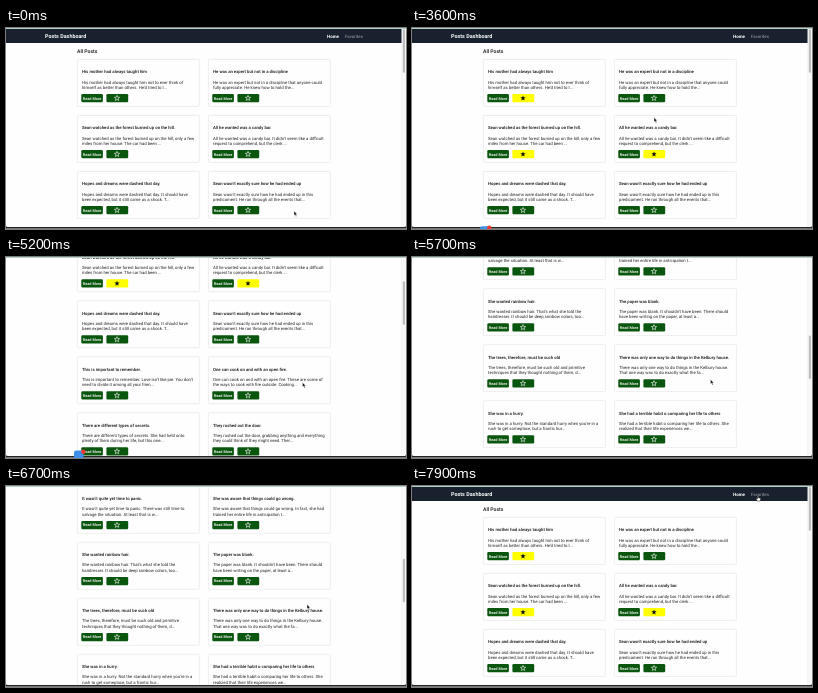
These frames come from a looping animation (400x201 px, 8 s). An HTML page:

```html
<!DOCTYPE html>
<html lang="en">
<head>
<meta charset="utf-8">
<title>Posts Dashboard</title>
<style>
  html, body { margin: 0; width: 100%; height: 100%; overflow: hidden; background: #fefefe; }
  svg { display: block; width: 100%; height: 100%; }
  text { font: 4.28px Roboto, sans-serif; fill: #222; text-rendering: geometricPrecision; }
  .title { font-weight: 500; fill: #111; }
  .heading { font-size: 5.1px; font-weight: 500; fill: #111; }
  .brand { font-size: 5.4px; font-weight: 700; fill: #fff; }
  .home { font-size: 4.5px; font-weight: 700; fill: #fff; }
  .link { font-size: 4.4px; fill: #a3a8ae; }
  .more { font-size: 3.85px; font-weight: 500; fill: #fff; text-anchor: middle; }
  .card { fill: #fefefe; stroke: #e2e2e2; stroke-width: .6; }
  .button { fill: #0b560f; }
  .star { fill: none; stroke: #fff; stroke-width: .6; }
  .favorite .toggle { fill: #ff0; }
  .favorite .star { fill: #111; stroke: none; }
  .cursor { fill: #111; stroke: #fff; stroke-width: .4; }
  .hand { fill: #fff; stroke: #111; stroke-width: .45; }
  .beam { fill: none; stroke: #333; stroke-width: .6; }
</style>
</head>
<body>
<svg viewBox="0 0 400 201" preserveAspectRatio="none">
  <g id="page">
    <rect y="1" width="396" height="14" fill="#18212d"/>
    <text class="brand" x="39" y="9.9">Posts Dashboard</text>
    <text class="home" x="321" y="9.7">Home</text>
    <text class="link" x="339" y="9.7">Favorites</text>
    <text class="heading" x="71" y="25">All Posts</text>
    <g id="posts"></g>
  </g>
  <rect x="395.8" y="1" width="4.2" height="199" fill="#f8f8f8"/>
  <rect x="395.6" y="1" width=".4" height="199" fill="#e6e6e6"/>
  <rect id="thumb" x="396.8" width="2.2" height="43.5" rx="1.1" fill="#bdbdbd"/>
  <rect width="400" height="1" fill="#b4d3c7"/>
  <rect y="200" width="400" height="1" fill="#777"/>
  <path d="M0 198Q.2 199 2 199H398Q399.8 199 400 198V200H0Z" fill="#222"/>
  <g id="dock">
    <rect x="68" y="0" width="9.5" height="10" rx="2" fill="#3f8fe8"/>
    <circle cx="77.3" cy="1.4" r="2.2" fill="#f03a34"/>
  </g>
  <g id="pointer">
    <path class="cursor" d="M0 0V4.6L1.1 3.6 1.9 5.4 2.7 5 1.9 3.3H3.3Z"/>
    <path class="hand" d="M-.5 0Q0-.6 .5 0V1.8L2.3 2.3Q2.8 2.5 2.6 3.3L2 5H-.6L-1.9 2.9Q-1.5 2.2-.5 3Z"/>
    <path class="beam" d="M-.9-2.4H.9M0-2.4V2.4M-.9 2.4H.9"/>
  </g>
</svg>
<script>
const LOOP = 8000, STEP = 100, ROW = 56;

// title, first line, second line; posts fill two columns row by row
const posts = [
  ["His mother had always taught him", "His mother had always taught him not to ever think of", "himself as better than others. He'd tried to l..."],
  ["He was an expert but not in a discipline", "He was an expert but not in a discipline that anyone could", "fully appreciate. He knew how to hold the..."],
  ["Sean watched as the forest burned up on the hill.", "Sean watched as the forest burned up on the hill, only a few", "miles from her house. The car had been ..."],
  ["All he wanted was a candy bar.", "All he wanted was a candy bar. It didn't seem like a difficult", "request to comprehend, but the clerk ..."],
  ["Hopes and dreams were dashed that day.", "Hopes and dreams were dashed that day. It should have", "been expected, but it still came as a shock. T..."],
  ["Sean wasn't exactly sure how he had ended up", "Sean wasn't exactly sure how he had ended up in this", "predicament. He ran through all the events that..."],
  ["This is important to remember.", "This is important to remember. Love isn't like pie. You don't", "need to divide it among all your frien..."],
  ["One can cook on and with an open fire.", "One can cook on and with an open fire. These are some of", "the ways to cook with fire outside. Cooking..."],
  ["There are different types of secrets.", "There are different types of secrets. She had held onto", "plenty of them during her life, but this one..."],
  ["They rushed out the door.", "They rushed out the door, grabbing anything and everything", "they could think of they might need. Ther..."],
  ["It wasn't quite yet time to panic.", "It wasn't quite yet time to panic. There was still time to", "salvage the situation. At least that is w..."],
  ["She was aware that things could go wrong.", "She was aware that things could go wrong. In fact, she had", "trained her entire life in anticipation t..."],
  ["She wanted rainbow hair.", "She wanted rainbow hair. That's what she told the", "hairdresser. It should be deep rainbow colors, too..."],
  ["The paper was blank.", "The paper was blank. It shouldn't have been. There should", "have been writing on the paper, at least a..."],
  ["The trees, therefore, must be such old", "The trees, therefore, must be such old and primitive", "techniques that they thought nothing of them, d..."],
  ["There was only one way to do things in the Kelbury house.", "There was only one way to do things in the Kelbury house.", "That one way was to do exactly what the fa..."],
  ["She was in a hurry.", "She was in a hurry. Not the standard hurry when you're in a", "rush to get someplace, but a frantic hur..."],
  ["She had a terrible habit o comparing her life to others", "She had a terrible habit o comparing her life to others. She", "realized that their life experiences we..."],
  ["The rain and wind abruptly stopped.", "The rain and wind abruptly stopped, but the sky still had the", "gray swirls of storms in the distance. D..."],
  ["He couldn't remember exactly where he had read it", "He couldn't remember exactly where he had read it, but he", "was sure that he had. The fact that she di..."]
];

// post index -> time its star is clicked
const clicks = { 0: 1200, 2: 2000, 3: 2900 };

// [time, x, y]
const pointerPath = [
  [0, 288, 183], [300, 92, 86], [500, 92, 86], [1000, 111, 70], [1300, 111, 70],
  [1700, 111.5, 125], [2200, 111.5, 125], [2800, 242, 125], [3100, 242, 125],
  [3600, 242, 89.5], [4300, 296.5, 125.5], [5300, 296.5, 125.5], [6100, 300.5, 119.5],
  [6700, 301, 118.5], [7400, 301, 118.5], [7800, 346, 10]
];
// [time, offset]: one swipe down, a rest, one swipe back to the top
const scrollPath = [[4850, 0], [5860, 360], [6420, 360], [7630, 0]];

const $ = id => document.getElementById(id);
const smooth = k => k * k * (3 - 2 * k);

function follow(path, time) {
  if (time <= path[0][0]) return path[0].slice(1);
  const next = path.findIndex(point => point[0] > time);
  if (next < 0) return path.at(-1).slice(1);
  const a = path[next - 1], b = path[next];
  const k = smooth((time - a[0]) / (b[0] - a[0]));
  return a.slice(1).map((v, i) => v + (b[i + 1] - v) * k);
}

const starPoints = Array.from({ length: 10 }, (_, i) => {
  const radius = i % 2 ? 1.2 : 2.8, angle = i * Math.PI / 5;
  return `${40 + radius * Math.sin(angle)},${39.2 - radius * Math.cos(angle)}`;
}).join(" ");

$("posts").innerHTML = posts.map(([title, first, second], i) => `
  <g transform="translate(${71 + i % 2 * 131} ${31 + (i >> 1) * ROW})">
    <rect class="card" x=".4" y=".4" width="122" height="47" rx="1"/>
    <text class="title" x="5" y="14.3">${title}</text>
    <text x="5" y="24.5">${first}</text>
    <text x="5" y="29.6">${second}</text>
    <rect class="button" x="4.3" y="35" width="21.6" height="8.3" rx="1.2"/>
    <text class="more" x="15.1" y="40.5">Read More</text>
    <rect class="button toggle" x="29.4" y="35" width="21.8" height="8.3" rx="1.2"/>
    <polygon class="star" points="${starPoints}"/>
  </g>`).join("");

const cards = $("posts").children;
const [arrow, hand, beam] = $("pointer").children;
const show = (node, visible) => node.setAttribute("visibility", visible ? "visible" : "hidden");
const move = (node, x, y) => node.setAttribute("transform", `translate(${x} ${y})`);

function draw(time) {
  const [scroll] = follow(scrollPath, time);
  move($("page"), 0, -scroll);
  $("thumb").setAttribute("y", 1.3 + scroll * 0.23);

  for (const i in clicks) cards[i].classList.toggle("favorite", time >= clicks[i]);

  const [x, y] = follow(pointerPath, time);
  move($("pointer"), x, y);
  const onStar = time < 4000 && (Math.abs(x - 111.5) < 10 || Math.abs(x - 242) < 10)
    && (Math.abs(y - 70) < 4 || Math.abs(y - 126) < 4);
  const onLink = y < 13;
  const onText = time >= 6000 && time < 6500;
  show(hand, onStar || onLink);
  show(beam, onText);
  show(arrow, !onStar && !onLink && !onText);

  // the dock icon bounces four times
  const bouncing = time > 2810 && time < 5690;
  const lift = 9 * Math.abs(Math.sin(Math.PI * (time - 2810) / 720));
  show($("dock"), bouncing);
  move($("dock"), 0, 201 - lift);
}

const start = performance.now();
function tick() {
  const time = (performance.now() - start) % LOOP;
  draw(Math.floor(time / STEP) * STEP);
  requestAnimationFrame(tick);
}
tick();
</script>
</body>
</html>
```
